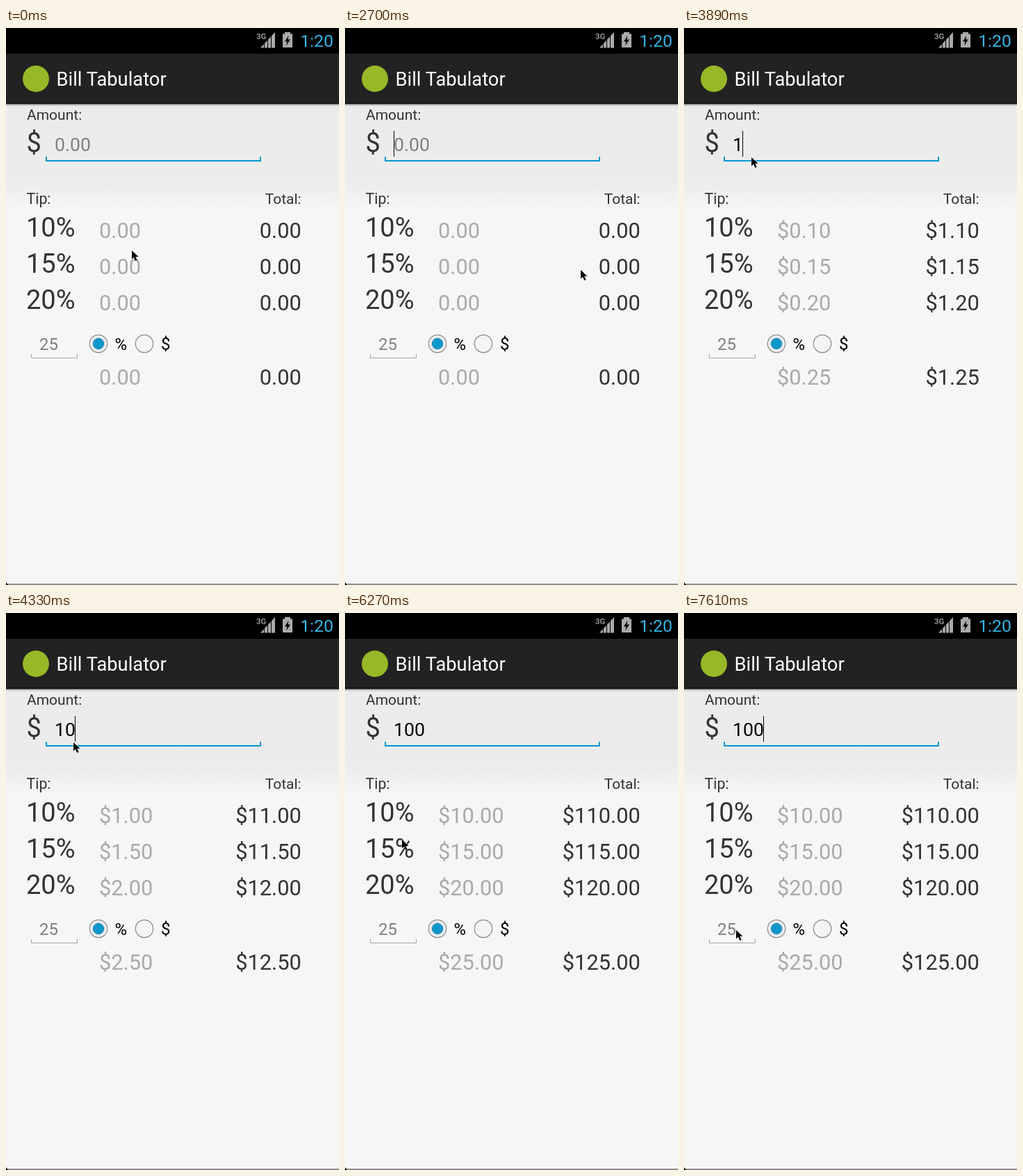
These frames come from a looping animation (479 px wide and 801 px high, 8 s). An HTML page:

```html
<!DOCTYPE html>
<html lang="en">
<head>
<meta charset="utf-8">
<title>Bill Tabulator</title>
<style>
html, body { margin: 0; width: 100%; height: 100%; overflow: hidden; background: #f6f6f6; }
svg { display: block; width: 479px; height: 801px; font-family: Roboto, sans-serif; }
</style>
</head>
<body>
<svg viewBox="0 0 479 801" xmlns="http://www.w3.org/2000/svg">
  <defs>
    <linearGradient id="page" x1="0" x2="0" y1="0" y2="1">
      <stop offset="0" stop-color="#ebebeb"/>
      <stop offset=".165" stop-color="#ececec"/>
      <stop offset=".22" stop-color="#f6f6f6"/>
    </linearGradient>
    <linearGradient id="shade" x1="0" x2="0" y1="0" y2="1">
      <stop offset="0" stop-color="#444"/>
      <stop offset=".4" stop-color="#c4c4c4"/>
      <stop offset="1" stop-color="#ebebeb"/>
    </linearGradient>
  </defs>
  <rect y="109" width="479" height="692" fill="url(#page)"/>
  <rect width="479" height="37"/>
  <rect y="37" width="479" height="72" fill="#222"/>
  <rect y="107" width="479" height="2" fill="#151515"/>
  <rect y="109" width="479" height="4" fill="url(#shade)"/>
  <rect id="edge" y="799" width="479" height="2" fill="#8c8c8c"/>
  <path d="M0 797L3 801H0Z"/>

  <path d="M366 28.5L387 6V28.5Z" fill="#aaa"/>
  <path d="M371.5 18V29M376.5 13V29M381.5 8V29" stroke="#000"/>
  <path d="M401 6H409V8.5H412V28H398V8.5H401Z" fill="#aaa"/>
  <path d="M406.5 11L401 19.5H404.5L403 25.5L409 16.5H405.5Z"/>
  <circle cx="43" cy="73" r="19" fill="#97b827"/>

  <path d="M58 185V191H366V185" fill="none" stroke="#0099cc" stroke-width="2"/>
  <path d="M36.5 469V474.5H102.5V469" fill="none" stroke="#a5a5a5"/>
  <g fill="#f4f4f4" stroke="#888" stroke-width="1.2">
    <circle cx="133" cy="454" r="12.7"/>
    <circle cx="199" cy="454" r="12.7"/>
  </g>
  <circle cx="133" cy="454" r="10" fill="#cfe3ec"/>
  <circle cx="133" cy="454" r="7.6" fill="#0d97ca" stroke="#2b83aa"/>
  <g id="labels"></g>
  <rect id="caret" y="148" width="1" height="37"/>
  <path id="mouse" d="M0 0V12.5L3 9.8L5.2 15L7.6 14L5.4 9H9.5Z" stroke="#fff" stroke-width=".8" paint-order="stroke"/>
</svg>
<script>
const LOOP = 8000;
const STEP = 149.2; // screen refresh interval
const byId = id => document.getElementById(id);

function label(text, x, y, size, fill = '#333', extra = {}) {
  const node = document.createElementNS('http://www.w3.org/2000/svg', 'text');
  const attrs = { x, y, fill, 'font-size': size, ...extra };
  for (const name in attrs) node.setAttribute(name, attrs[name]);
  node.textContent = text;
  byId('labels').append(node);
  return node;
}

const atEnd = { 'text-anchor': 'end' };
label('3G', 360, 16, 11.5, '#aaa', { 'font-weight': 500 });
label('1:20', 471, 27.3, 24.8, '#33b5e5', atEnd);
label('Bill Tabulator', 72.5, 83, 27.3, '#fff');
label('Amount:', 30, 132, 21);
label('$', 29.5, 178, 38);
label('Tip:', 29.5, 253, 21.3);
label('Total:', 424.7, 253, 21, '#333', atEnd);
label('25', 48, 462.5, 24, '#808080');
label('%', 156.5, 463, 24, '#000');
label('$', 223, 463, 24, '#000');
const input = label('', 70, 177, 26.6);

const rows = [10, 15, 20, 25].map((percent, i) => {
  const custom = percent === 25;
  const y = custom ? 513 : 302 + 52 * i;
  if (!custom) label(percent + '%', 29, y - 2, 38);
  return {
    percent,
    tip: label('', 134, y, 30.8, '#aaa'),
    total: label('', 424.8, y, 30.8, '#333', atEnd)
  };
});

const AMOUNT = '100';
const keyTimes = [3870, 4320, 4470];
const home = { x: 181, y: 320 };
const moves = [
  { start: 2240, duration: 145, x: 361, y: 362 },
  { start: 2600, duration: 830, x: 97, y: 186 },
  { start: 5860, duration: 706, x: 69, y: 443 },
  { start: 7320, duration: 285, x: 75, y: 456 }
];

function pointerAt(time) {
  return moves.reduce((from, { start, duration, x, y }) => {
    const progress = Math.min(1, Math.max(0, (time - start) / duration)) ** 1.1;
    return { x: from.x + (x - from.x) * progress, y: from.y + (y - from.y) * progress };
  }, home);
}

// The caret blinks once a second and restarts with each key.
function caretShown(time, lastKey = -735) {
  return (time - lastKey + 30) % 1000 < 500;
}

function render(time) {
  const pressed = keyTimes.filter(key => key <= time);
  const typed = AMOUNT.slice(0, pressed.length);
  const amount = Number(typed);
  const money = value => amount ? '$' + value.toFixed(2) : '0.00';

  input.textContent = typed || '0.00';
  input.setAttribute('fill', typed ? '#000' : '#808080');
  for (const { percent, tip, total } of rows) {
    tip.textContent = money(amount * percent / 100);
    total.textContent = money(amount * (100 + percent) / 100);
  }
  byId('caret').setAttribute('x', Math.floor(70 + 14.8 * typed.length));
  byId('caret').setAttribute('opacity', Number(caretShown(time, pressed.at(-1))));
  const { x, y } = pointerAt(time);
  byId('mouse').setAttribute('transform', `translate(${Math.round(x)} ${Math.round(y)})`);
}

const begin = performance.now();
function tick() {
  const time = (performance.now() - begin) % LOOP;
  render(Math.floor(time / STEP) * STEP);
  requestAnimationFrame(tick);
}
tick();
</script>
</body>
</html>
```
